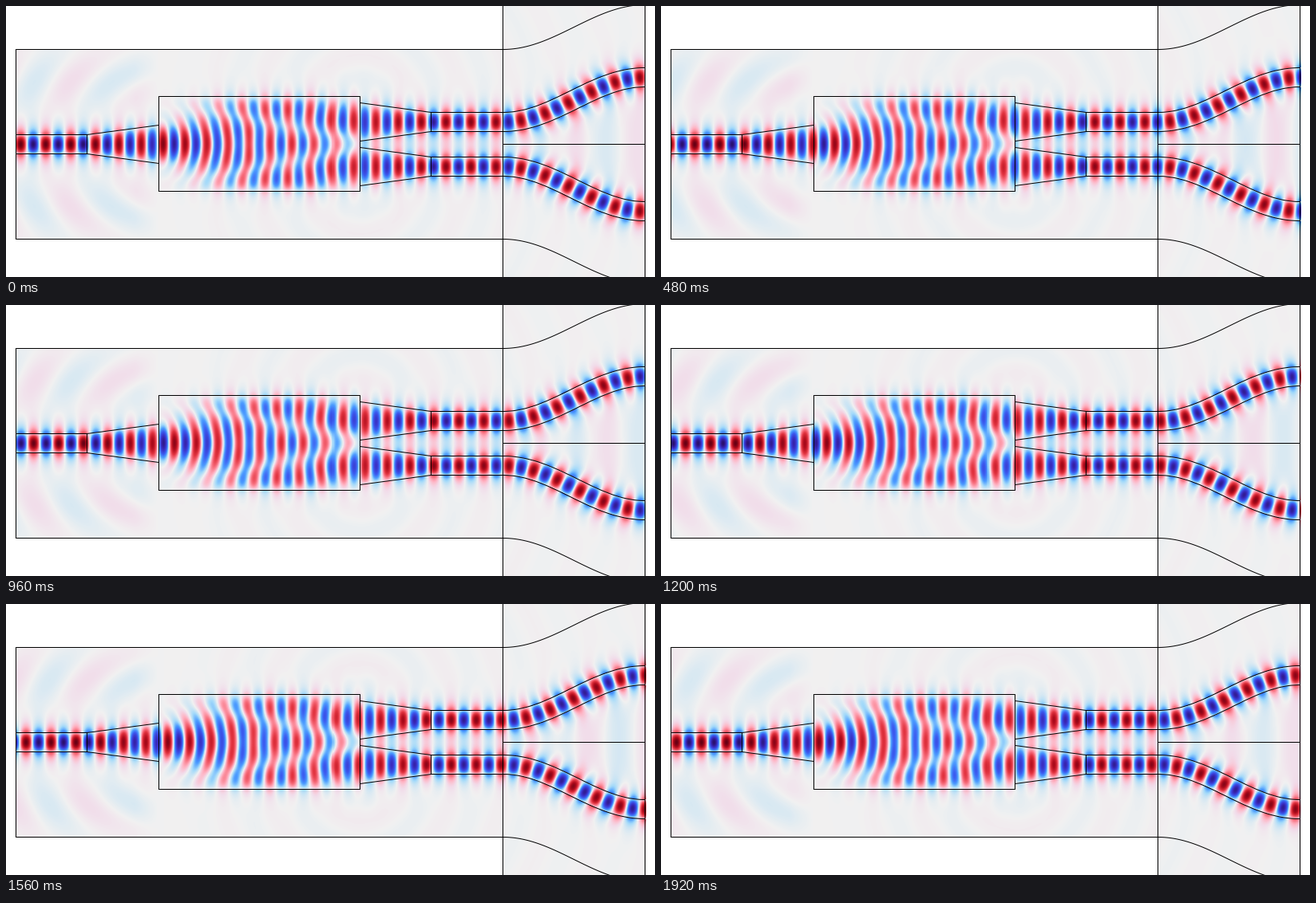
A matplotlib script that plays this animation: 813x340 px, repeating every 1.98 s.

```python
import numpy as np
import matplotlib.pyplot as plt
from matplotlib.animation import FuncAnimation
from matplotlib.colors import LinearSegmentedColormap

W, H, N = 813, 340, 33
MID = 173                       # symmetry axis
X_IN, X_BOX, X_OUT, X_STR, X_BEND, X_END = 101, 191, 443, 532, 622, 800
BOX_W = 119
K_CORE = 2 * np.pi / 26.35
DECAY, JUMP = 0.13, 4.0         # cladding decay rate, step of the field at a wall
BOX_GAIN, ARM_GAIN = 1.15, 0.88

wave = LinearSegmentedColormap.from_list("wave", [
    (0.00, "#2a1070"), (0.13, "#3a2cc0"), (0.25, "#3c5cf0"),
    (0.34, "#4c9cff"), (0.42, "#a4dafa"), (0.47, "#d6e8f3"),
    (0.50, "#f1f1f1"), (0.53, "#f2dcea"), (0.58, "#ffb4c4"),
    (0.66, "#f8707f"), (0.75, "#e23440"), (0.87, "#b00c1c"),
    (1.00, "#680014")], N=512)
wave.set_bad("white")


def beta(width, m=0):
    kappa = (m + 1) * np.pi / (width + 0.4)
    return np.sqrt(K_CORE**2 - kappa**2)


def mode(d, width, m=0):
    """Transverse profile: cosine in the core, decaying tail outside."""
    k = (m + 1) * np.pi / (width + 2)
    tail = JUMP * np.cos(k * width / 2) * np.exp(-DECAY * (np.abs(d) - width / 2))
    return np.where(np.abs(d) <= width / 2, np.cos(k * d), tail)


def guide_width(x):
    return np.interp(x, [X_IN, X_BOX, X_OUT, X_STR], [24, 48, 48, 24])


def arm(x):
    """Centre line and slope of the upper output arm."""
    t = np.clip((x - X_BEND) / (X_END - X_BEND), 0, 1)
    slope = -28 * np.pi / (X_END - X_BEND) * np.sin(np.pi * t)
    return 145 - 28 * (1 - np.cos(np.pi * t)), slope


def path_phase(xs, stretch=1.0):
    step = beta(guide_width(xs)) * stretch
    return np.concatenate([[0], np.cumsum((step[1:] + step[:-1]) / 2 * np.diff(xs))])


def amplitude(x):
    w = guide_width(x)
    return np.sqrt(beta(w) / beta(24) * 24 / w)


X, Y = np.meshgrid(np.arange(W, dtype=float), np.arange(H, dtype=float))
D = Y - MID
U = np.zeros((H, W), complex)

# input guide and taper
xs = np.arange(0, X_BOX + 1.0)
ph = path_phase(xs)
ph -= np.interp(18, xs, ph)
left = amplitude(X) * mode(D, guide_width(X)) * np.exp(1j * np.interp(X, xs, ph))
U += np.where(X < X_BOX, left, 0)

# multimode box: even modes launched by the taper
yy = np.linspace(-24, 24, 481)
launch = np.cos(np.pi * yy / 50)


def box_field(x, d):
    total = 0
    for m in (0, 2, 4, 6):
        c = 2 / (BOX_W + 2) * np.sum(
            launch * np.cos((m + 1) * np.pi * yy / (BOX_W + 2))) * (yy[1] - yy[0])
        total = total + c * mode(d, BOX_W, m) * np.exp(
            1j * beta(120, m) * (x - X_BOX))
    return BOX_GAIN * amplitude(X_BOX) * total * np.exp(1j * ph[-1])


in_box = (X >= X_BOX) & (X < X_OUT)
U += np.where(in_box, box_field(X, D + 0.5), 0)

# output tapers and bends, mirrored about the axis
xo = np.arange(X_OUT, 861.0)
po = path_phase(xo, np.hypot(1, arm(xo)[1])**0.75)
po += np.angle(box_field(X_OUT, -28.0))
core = np.abs(D) <= np.where(X < X_BOX, guide_width(X), BOX_W) / 2
core &= X < X_OUT
for y in (Y, 2 * MID - Y):
    mid, slope = arm(X)
    dy = y - mid
    foot = X + np.clip(dy, -30, 30) * slope / (1 + slope**2)
    d = dy / np.hypot(1, slope)
    w = guide_width(X)
    out = ARM_GAIN * amplitude(X) * mode(d, w) * np.exp(
        1j * np.interp(foot, xo, po))
    U += np.where(X >= X_OUT, out, 0)
    core |= (X >= X_OUT) & (np.abs(d) <= w / 2)

# faint radiation in the cladding
clad = ~core
r = np.hypot(X - 204, D)
side = np.exp(-((np.abs(D) - 78) / 38)**2) * np.clip((X_BOX - X) / 30, 0, 1)
U += clad * 0.055 * side * np.exp(1j * (np.pi - 0.0785 * (r - 106)))

r = np.hypot(X - X_OUT, np.abs(D) - 50)
ring = 0.02 * np.clip((X - 200) / 80, 0, 1) * np.exp(-r / 260)
U += clad * ring * np.exp(-1j * 0.1 * r)

ramp = np.clip((X - 640) / 70, 0, 1)
U += clad * 0.055 * ramp * np.exp(-(D / 75)**4) * np.exp(
    2j * np.pi * (X - 711) / 77)

domain = ((X >= 12) & (X <= X_BEND) & (Y >= 54) & (Y <= 292)) | (
    (X >= X_BEND) & (X <= X_END))


def field(n):
    v = np.real(U * np.exp(2j * np.pi * n / N))
    return np.ma.masked_where(~domain, v)


fig = plt.figure(figsize=(W / 100, H / 100), dpi=100, facecolor="white")
ax = fig.add_axes([0, 0, 1, 1])
ax.axis("off")
img = ax.imshow(field(0), cmap=wave, vmin=-1, vmax=1, interpolation="nearest",
                aspect="auto", extent=(-0.5, W - 0.5, H - 0.5, -0.5))
ax.set_xlim(-0.5, W - 0.5)
ax.set_ylim(H - 0.5, -0.5)


def line(x, y):
    # points lie on pixel centres, so snapping would push them one pixel off
    ax.plot(x, y, color="black", lw=0.72, solid_capstyle="projecting", snap=False)


def mirrored(x, y):
    line(x, y)
    line(x, 2 * MID - np.asarray(y))


line([12, 12], [54, 292])
line([X_IN, X_IN], [161, 185])
line([X_BOX, X_BOX], [113, 232])
line([X_OUT, X_OUT], [113, 232])
line([X_BEND, X_BEND], [-1, H])
line([X_END, X_END], [-1, H])
line([X_BEND, X_END], [MID, MID])
line([X_BOX, X_OUT], [113, 113])
line([X_BOX, X_OUT], [232, 232])
mirrored([12, X_BEND], [54, 54])
mirrored([12, X_IN], [161, 161])
mirrored([X_IN, X_BOX], [161, 149])
mirrored([X_STR, X_STR], [133, 157])

xb = np.linspace(X_BEND, X_END, 120)
yb, sb = arm(xb)
norm = np.hypot(1, sb)
for s in (-1, 1):
    mirrored([X_OUT, X_STR], [145 + 24 * s, 145 + 12 * s])
    mirrored([X_STR, X_BEND], [145 + 12 * s] * 2)
    mirrored(xb - 12 * s * sb / norm, yb + 12 * s / norm)
mirrored(xb, yb - 91)


def update(n):
    img.set_data(field(n))
    return (img,)


anim = FuncAnimation(fig, update, frames=N, interval=60, repeat=True,
                     repeat_delay=0)
plt.show()
```
